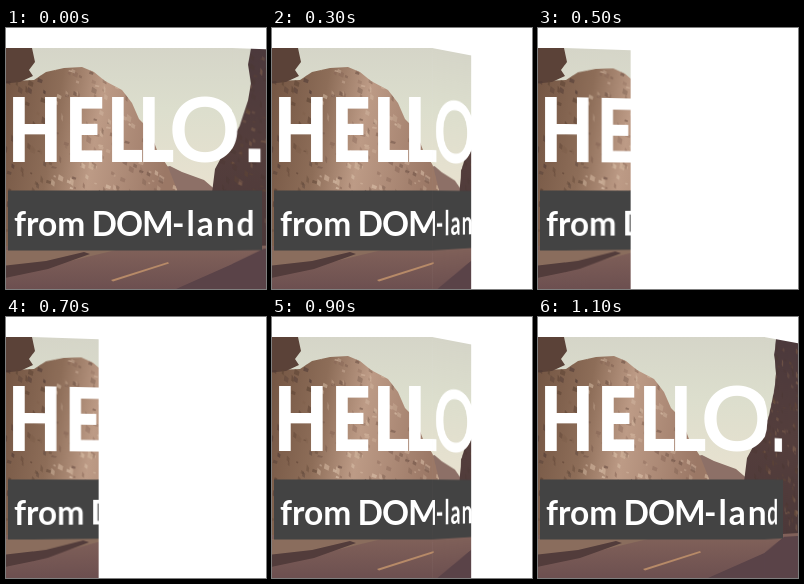
Write an HTML page that moves like this. It is 260 px wide and 261 px high and loops after 1200 ms.

```html
<!DOCTYPE html>
<html lang="en">
<head>
<meta charset="utf-8">
<title>Hello</title>
<style>
  html, body { margin: 0; width: 100%; height: 100%; overflow: hidden; background: #fff; }
  #stage {
    position: relative; width: 260px; height: 261px; overflow: hidden;
    perspective: 1000px; perspective-origin: 127px 172px;
  }
  .layer { position: absolute; left: -39px; top: 20px; width: 332px; height: 304px; }
  svg { display: block; }
  text { fill: #fff; font-family: Lato, "Open Sans", sans-serif; font-weight: 700; }
  .big { font-size: 89px; }
  .heavy { font-weight: 900; }
  .dot { font: 700 90px "Liberation Sans", Arial, sans-serif; }
  .small { font-size: 33.5px; }
  .caps { letter-spacing: -1px; }
  .wide { letter-spacing: 2px; }
</style>
</head>
<body>
<div id="stage">
  <div class="layer" id="flat">
    <svg width="332" height="304" viewBox="-39 20 332 304">
      <defs>
        <linearGradient id="sky" x2="0" y2="1">
          <stop offset="0" stop-color="#d5d5c8"/>
          <stop offset=".2" stop-color="#dcdecd"/>
          <stop offset=".5" stop-color="#eae2d0"/>
        </linearGradient>
        <linearGradient id="rock" x2="1" y2=".15">
          <stop offset=".15" stop-color="#705240"/>
          <stop offset=".45" stop-color="#8d6d58"/>
          <stop offset=".65" stop-color="#bd9b86"/>
          <stop offset="1" stop-color="#9b7866"/>
        </linearGradient>
        <linearGradient id="wall" x2="0" y2="1">
          <stop offset="0" stop-color="#4c393c"/>
          <stop offset=".5" stop-color="#543e3c"/>
          <stop offset="1" stop-color="#4c3839"/>
        </linearGradient>
        <linearGradient id="road" x2="0" y2="1">
          <stop offset="0" stop-color="#82625a"/>
          <stop offset=".4" stop-color="#6d5050"/>
          <stop offset="1" stop-color="#503d46"/>
        </linearGradient>
        <clipPath id="cliffs">
          <path id="mid" d="M-39 55L28 52 40 44 58 40 76 39 88 44 99 53 116 62 126 75 133 91 143 101 151 122 162 139 172 164V225H-39Z"/>
          <path id="right" d="M293 20H246L243 36 246 55 243 72 234 98 226 112 216 128 209 141 206 165V225H293Z"/>
        </clipPath>
      </defs>
      <rect x="-39" y="20" width="332" height="304" fill="url(#sky)"/>
      <path d="M140 143L164 138 176 144 198 152 212 164V225H140Z" fill="#8d7067"/>
      <use href="#mid" fill="url(#rock)"/>
      <path d="M-39 20H26L29 34 23 42 27 48 14 54-39 60Z" fill="#5b4238"/>
      <use href="#right" fill="url(#wall)"/>
      <g class="flecks" clip-path="url(#cliffs)"></g>
      <rect x="-39" y="218" width="332" height="106" fill="url(#road)"/>
      <path d="M-39 222H110L60 234-39 246Z" fill="#8a6d5d"/>
      <path d="M-39 242L40 233 78 224 84 226 42 241-39 258Z" fill="#523c3b"/>
      <path d="M170 261L260 221H293V324H120Z" fill="#5a4348"/>
      <path d="M105 252L162 234 163 235.500 107 253.500Z" fill="#b78a68"/>
      <rect x="2" y="162.500" width="256" height="60" fill="#434343"/>
      <text class="big heavy" transform="translate(2.200 134) scale(.77 1)" x="0 74 128.500 169">HELL</text>
      <text class="big" x="163" y="134">O<tspan class="dot" x="237.500">.</tspan></text>
      <text class="small" x="8" y="208">from <tspan class="caps" x="85.500">DOM</tspan><tspan class="wide" x="166">-land</tspan></text>
    </svg>
  </div>
  <div class="layer" id="flap"></div>
</div>
<script>
  const flat = document.getElementById("flat");
  const flap = document.getElementById("flap");
  const WIDTH = 332, PANEL = 66.4, STEP = 100;

  // Folding panel and its angle at each step; the way back mirrors the way out.
  const FOLD = [[4, 14], [4, 48], [3, 18], [3, 50], [2, 25], [1, 13], [1, 64]];
  const LAST = FOLD.length - 1;

  let seed = 17;
  const rand = (lo, hi) => {
    seed = (seed * 16807) % 2147483647;
    return lo + (hi - lo) * seed / 2147483647;
  };

  // Craggy facets: dark scrub on the left and right, lit stone between.
  function addFlecks(group) {
    const dark = ["#4c3833", "#5f4536", "#80614d"];
    const lit = ["#d3b7a0", "#6f5347", "#dcc3ad", "#896858"];
    let out = "";
    for (let i = 0; i < 650; i++) {
      const x = rand(-39, 293), y = rand(25, 218);
      const w = rand(1.5, 5), h = rand(2, 9);
      const tones = x > 200 || x < 45 ? dark : lit;
      out += `<path d="M${x} ${y}l${w} ${h * .4} ${-w * .2} ${h * .6} ${-w} ${-h * .3}z" fill="${tones[i % tones.length]}" opacity="${rand(.3, .65)}"/>`;
    }
    group.innerHTML = out;
  }

  function draw(time) {
    const step = Math.floor(time / STEP) % (2 * LAST);
    const [panel, angle] = FOLD[LAST - Math.abs(LAST - step)];
    const hinge = panel * PANEL;
    flat.style.clipPath = `inset(0 ${WIDTH - hinge - .4}px 0 0)`;
    flap.style.clipPath = `inset(0 ${WIDTH - hinge - PANEL}px 0 ${hinge}px)`;
    flap.style.transformOrigin = `${hinge}px 50%`;
    flap.style.transform = `rotateY(${angle}deg)`;
  }

  addFlecks(flat.querySelector(".flecks"));
  flap.append(flat.firstElementChild.cloneNode(true));

  const start = performance.now();
  function tick() {
    draw(performance.now() - start);
    requestAnimationFrame(tick);
  }
  tick();
</script>
</body>
</html>
```
